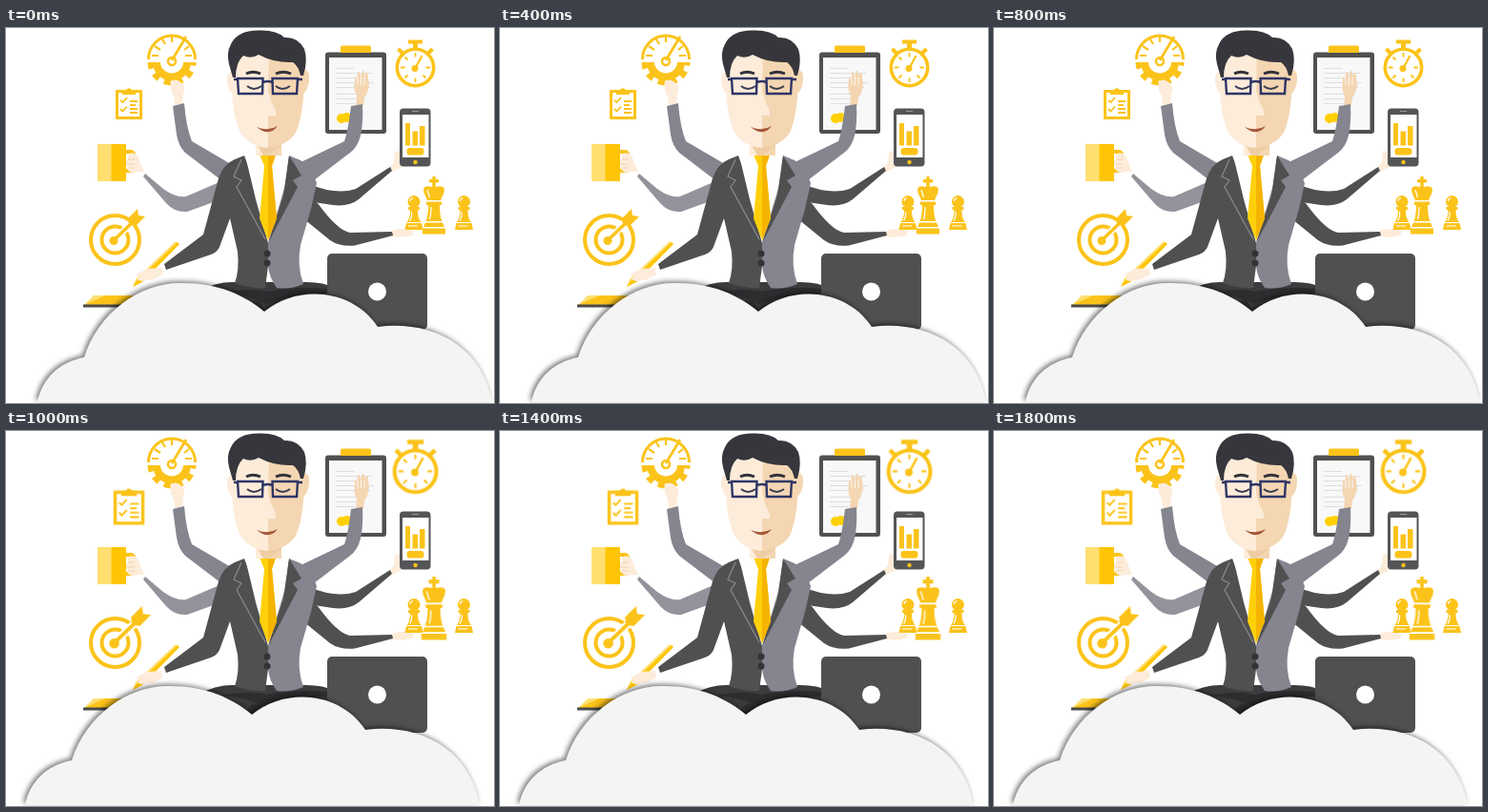
These frames come from a looping animation (512x394 px, 2 s). An HTML page:

```html
<!DOCTYPE html>
<html lang="en">
<head>
<meta charset="utf-8">
<title>Multitasking</title>
<style>
  html, body { margin: 0; width: 100%; height: 100%; overflow: hidden; background: #fff; }
  svg { display: block; width: 512px; height: 394px; }
  .y { fill: #fbc31a; }
  .yl { fill: #ffdf70; }
  .d { fill: #505051; }
  .g { fill: #84858e; }
  .gl { fill: #92939b; }
  .s { fill: #fdecda; }
  .sd { fill: #f4d6b2; }
  .w { fill: #fff; }
  .ln { fill: none; stroke: #fbc31a; }
  .swap { animation: swap .4s step-end infinite; }
  .cloud { --to: translateX(-13px); }
  .cloud path { fill: #f4f4f4; filter: drop-shadow(-2px -2px 2.5px rgba(0, 0, 0, .5)); }
  .list { --to: scale(1.16); transform-origin: 129px 80px; }
  .watch { --to: scale(1.14); transform-origin: 429px 36px; }
  .king { --to: scale(1.1); transform-origin: 449px 186px; }
  .dart { --to: scale(1.17); transform-origin: 110px 226px; }
  @keyframes swap { 50%, 100% { transform: var(--to); } }
</style>
</head>
<body>
<svg viewBox="0 0 512 394">
  <defs>
    <g id="pawn">
      <circle cx="0" cy="182.500" r="6.500"/>
      <path d="M-6 188H6V191H4C4 197 5 201 7.500 204H-7.500C-5 201 -4 197 -4 191H-6ZM-8 205H8L9.500 212H-9.500Z"/>
      <path fill="none" stroke="#fff" stroke-width="1.200" d="M-4 182Q-4 179 -1 178.500M-2.500 193Q-2 199 -4.500 202.500M-6 208H4"/>
    </g>
  </defs>

  <!-- gauge -->
  <g class="ln" stroke-width="3">
    <path d="M149.500 33A24.500 25 0 1 1 198.500 33"/>
    <path stroke-width="2.200" d="M153 29H160M156 19L162 23M163.500 11L167 17M174 8V15M192 19L187 23M195 29H188"/>
    <path stroke-width="2.800" d="M174 34L189 9"/>
    <path stroke-width="8" d="M158 36A16 15.500 0 0 0 190 36"/>
    <path stroke-width="6" stroke-dasharray="7 6" d="M151.500 36A22.500 21.500 0 0 0 196.500 36"/>
  </g>
  <circle class="ln" cx="174" cy="35" r="4" stroke-width="2.500"/>

  <!-- checklist -->
  <g class="swap list">
    <rect class="ln" x="116.500" y="66.500" width="25" height="28" stroke-width="3"/>
    <path class="y" d="M122 65H126A3.500 3.500 0 0 1 132 65H136V70H122Z"/>
    <path class="ln" stroke-width="1.800" d="M120 76L122.500 78L127 73M120 85L122.500 87.500L127 82.500M130 77H138M130 81H136M130 85H138M130 89H138"/>
  </g>

  <!-- mug -->
  <rect class="ln" x="123" y="130" width="11" height="20" rx="3" stroke-width="4"/>
  <path class="yl" d="M96 122H111V161H96Z"/>
  <path fill="#fdc505" d="M110.500 122H126V161H110.500Z"/>
  <path class="s" d="M128 133Q133 129 138 134L142 144L145 151L138 151Q131 154 127 148V144H126V139H128Z"/>
  <path fill="none" stroke="#f2cda6" stroke-width=".8" d="M128 138H135M127 143H135M128 147H135"/>

  <!-- target -->
  <g class="ln" stroke-width="4">
    <circle cx="114.500" cy="222.500" r="25.500"/>
    <circle cx="114.500" cy="222.500" r="14"/>
  </g>
  <g class="swap dart">
    <path d="M114 222L134 203" stroke="#fff" stroke-width="7"/>
    <path class="ln" d="M110 226L136 201" stroke-width="3.500"/>
    <circle class="y" cx="113" cy="223.500" r="4.500"/>
    <path class="y" d="M128 200L138 190L139 197L146 198L136 208L129 207Z"/>
  </g>

  <!-- clipboard -->
  <rect class="d" x="335" y="25.500" width="64" height="85.500" rx="3"/>
  <path fill="#f8f8f9" d="M339 31H394.500V107H339Z"/>
  <path class="y" d="M351 26V20Q351 18.500 353 18.500H381Q383 18.500 383 20V26Z"/>
  <path fill="none" stroke="#dededf" d="M346 42.500H365M346 47.500H384M346 52.500H380M346 57.500H386M346 62.500H382M346 69.500H370M346 74.500H374M346 79.500H366"/>
  <g fill="#ffd000">
    <circle cx="352" cy="95" r="5"/>
    <circle cx="357.500" cy="94" r="5"/>
  </g>

  <!-- stopwatch -->
  <g class="swap watch">
    <circle class="ln" cx="429.500" cy="41.500" r="19.200" stroke-width="3.600"/>
    <path class="y" d="M422 12.500H437V16.500H432V23H427V16.500H422Z"/>
    <path class="ln" stroke-width="4" d="M411.500 22L416.500 27M447.500 22L442.500 27"/>
    <path class="ln" stroke-width="1.800" d="M429.500 26V30.500M429.500 52.500V57M414 41.500H418.500M440.500 41.500H445M418.500 30.500L421.500 33.500M418.500 52.500L421.500 49.500M440.500 52.500L437.500 49.500"/>
    <path class="ln" stroke-width="2.200" d="M428 45L436.500 29"/>
    <circle class="y" cx="429" cy="42.500" r="3.500"/>
  </g>

  <!-- phone -->
  <path class="s" d="M402 147L407 141L408 130Q412 128 416 132V146L405 151Z"/>
  <rect x="413" y="84.500" width="32.500" height="61" rx="4" fill="#545557"/>
  <path class="w" d="M416 91H443.500V136H416Z"/>
  <path stroke="#999" d="M426 87.500H433"/>
  <path class="y" d="M419 100H424V123.500H419ZM426.500 108.500H432V123.500H426.500ZM434 103H439.500V123.500H434Z"/>
  <rect class="y" x="420.500" y="126" width="18" height="7.500" rx="3"/>
  <circle class="y" cx="429.500" cy="141" r="2.200"/>

  <!-- chess -->
  <path class="s" d="M405 213Q415 209 428 213L426 218Q415 221 405 219Z"/>
  <g class="y">
    <use href="#pawn" x="428"/>
    <use href="#pawn" x="480.500"/>
    <g class="swap king">
      <path class="w" d="M438 165H460L457 204L463 218H435L441 204Z"/>
      <path d="M447.300 156H450.700V159H454V162.500H450.700V167Q462 164 459.500 173L456 181H442L438.500 173Q436 164 447.300 167V162.500H444V159H447.300ZM441 182.500H457V186H455Q455 197 457.500 203H440.500Q443 197 443 186H441ZM440 204.500H458L460 209H438ZM437 210.500H461V216.500H437Z"/>
      <path fill="none" stroke="#fff" stroke-width="1.200" d="M442 170L444.500 178M446 188Q446 196 444.500 201"/>
    </g>
  </g>

  <!-- rear arms -->
  <path class="s" d="M173 59Q175 53 180 55L185 58Q189 64 186 69L185 80L177 81L176 71Q172 67 173 59Z"/>
  <path class="gl" d="M146 153L165 169Q179 179 189 177L226 161V180L190 193Q177 194 168 184L144 156Z"/>
  <path class="g" d="M175 82L187 79Q189 104 195 119L236 143L226 160L188 131Q181 124 179 112Z"/>
  <path class="sd" d="M366 55Q365 48 368 54L369 47Q371 44 372 51L374 45Q376 43 376 50L378 47Q380 46 380 53L381 58Q380 69 376 73L375 82H367L368 71Q364 65 366 55Z"/>
  <path fill="none" stroke="#fff" stroke-width=".8" d="M369 52V60M372.500 51V60M376 51V60"/>
  <path class="d" d="M318 164Q347 176 367 169L403 146L405 150L370 180Q360 188 343 186L316 182Z"/>
  <path class="d" d="M316 178L327 184Q348 213 361 215L405 214L406 218L366 228.500Q350 230 340 223L313 201Z"/>
  <path class="g" d="M362 82L374 80Q375 100 372 113Q369 125 361 131L323 160L305 143L355 119Q359 108 362 82Z"/>

  <!-- notepad and pen -->
  <path class="yl" d="M92 281H140L128 291H82Z"/>
  <path class="y" d="M104 281H140L128 291H82Z"/>
  <path d="M81 292H150" stroke="#4b4b4b" stroke-width="3"/>
  <path class="yl" d="M178 224L181 227L142 267L133 272L136 264Z"/>
  <path fill="#fdc505" d="M180 225L182 227L143 267L133 272L137 266Z"/>
  <path class="s" d="M136 259L148 253L163 252L164 259L155 264L142 266Q135 264 141 261Z"/>

  <!-- legs -->
  <path fill="#3c3c3e" d="M203 276Q222 266 240 267H310Q332 266 345 273V305H205Z"/>
  <path fill="#2d2d30" d="M226 278Q255 272 274 277Q300 271 338 274V279Q300 279 272 290Q250 279 226 278Z"/>
  <path fill="#2d2d30" d="M252 296Q257 283 267 288L272 300H254Z"/>

  <!-- suit -->
  <path class="d" d="M250 134L240 138Q228 143 223 158L207 217L166 248L168 254L215 238Q222 235 224 230L235 200L243 235Q245 254 240 268Q256 274 272 273L275 250V200Z"/>
  <path class="g" d="M297 134L309 139Q320 145 326 163L320 190L309 228Q305 250 312 269Q298 275 284 273Q276 262 275 250V215Z"/>
  <path class="w" d="M251 134H297L293 165L275 226L262 180Z"/>
  <path fill="none" stroke="#8a8a90" stroke-width="1.200" d="M247 138L239 156L247 160L242 167L272 222"/>
  <path class="d" d="M297 134L310 155L301 160L306 167L275 226L291 176Z"/>
  <path fill="#ffd00a" d="M266 133H283L279 145L284 200L275 223L266 200L271 145Z"/>
  <path fill="#f5b400" d="M275 133H283L279 145L284 200L275 223Z"/>
  <circle cx="274" cy="237" r="3.500" fill="#333337"/>
  <circle cx="274" cy="247" r="3.500" fill="#333337"/>

  <!-- head -->
  <path class="s" d="M262 112H275V134H262Z"/>
  <path class="sd" d="M275 112H289V134H275Z"/>
  <path fill="#efcda4" d="M262 120Q275 128 289 119V124L275 134H270Z"/>
  <path class="s" d="M240 46Q231 44 232 56Q233 68 241 71Z"/>
  <path class="sd" d="M310 44Q319 42 318 55Q317 67 310 70Z"/>
  <path class="sd" d="M272 22H308L313 56Q312 92 304 110Q294 125 272 126Z"/>
  <path class="s" d="M276 22H242L237 56Q237 92 246 110Q256 125 275 126V92H283Q284 86 279 79L275 66Z"/>
  <path fill="#36363c" d="M238 52L234 38Q231 26 236 17Q243 2 266 2.500Q284 2 292 10Q306 9 313 22Q317 34 312 50H309Q307 40 301 36Q282 37 265 28Q257 33 249 29Q241 36 241 52Z"/>
  <path fill="none" stroke="#33333a" stroke-width="3" d="M252 48Q259 44.500 267 48M283 48Q291 44.500 299 48"/>
  <path fill="none" stroke="#3a3c55" stroke-width="2" d="M253 61Q260 67 268 61M283 61Q290 67 298 61"/>
  <g fill="none" stroke="#2e3566" stroke-width="2.400">
    <path d="M243 53H269.500L269 69H244ZM279.500 53H306L305 69H280ZM270 57Q275 55 279 57M239 54H243M306 54H311"/>
  </g>
  <path fill="#a5583a" d="M263 104Q275 109 285 103Q276 115 263 104Z"/>

  <!-- laptop -->
  <rect class="d" x="337" y="237" width="105" height="80" rx="5"/>
  <circle class="w" cx="389.500" cy="277" r="9.500"/>

  <g class="swap cloud">
    <path d="M33 393C38 368 56 351 82 346C96 300 140 268 182 268C220 267 250 280 271 298C306 269 364 274 390 314C442 307 499 330 510 393Z"/>
  </g>
</svg>
</body>
</html>
```
